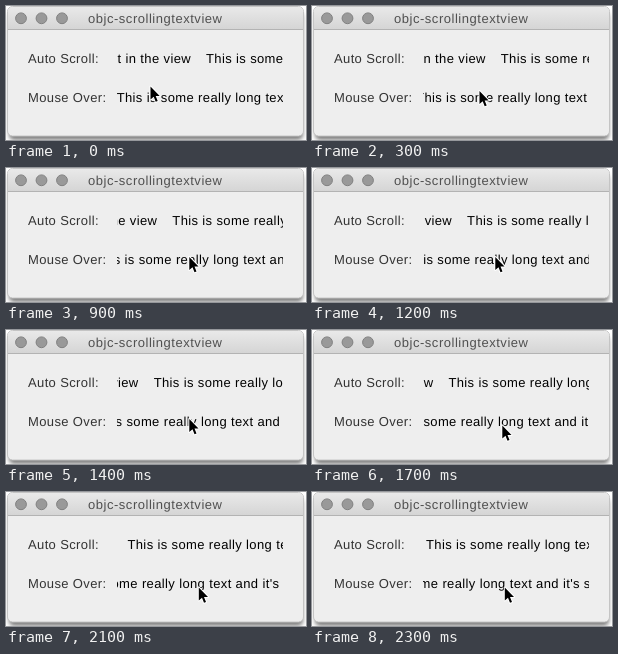
An HTML page that plays this animation: 300 px wide and 134 px high, repeating every 2400 ms.

```html
<!DOCTYPE html>
<html lang="en">
<head>
<meta charset="utf-8">
<title>Scrolling text view</title>
<style>
  html, body { margin: 0; width: 100%; height: 100%; overflow: hidden; background: #fff; }
  svg { display: block; width: 300px; height: 134px; }
  text {
    font: 13px "Liberation Sans", Arial, sans-serif;
    letter-spacing: .37px;
    text-rendering: geometricPrecision;
    white-space: pre;
  }
  .title { fill: #505050; letter-spacing: .53px; }
  .label { fill: #333; }
</style>
</head>
<body>
<svg viewBox="0 0 300 134">
  <defs>
    <linearGradient id="bar" x2="0" y2="1">
      <stop stop-color="#e9e9e9"/>
      <stop offset="1" stop-color="#d5d5d5"/>
    </linearGradient>
    <filter id="soft" x="-10%" y="-10%" width="120%" height="120%">
      <feGaussianBlur stdDeviation="2"/>
    </filter>
    <clipPath id="field"><rect x="111" y="40" width="166" height="70"/></clipPath>
  </defs>

  <rect x="3" y="6" width="294" height="128" rx="5" fill="#000" opacity=".5" filter="url(#soft)"/>
  <rect x="1.5" y=".5" width="296" height="129.5" rx="5" fill="#eee" stroke="#c4c4c4"/>
  <path d="M2 23V5.5Q2 1 6.5 1h286Q297 1 297 5.5V23z" fill="url(#bar)"/>
  <path d="M2 23.5h295" stroke="#b3b3b3"/>
  <g fill="#999" stroke="#808080">
    <circle cx="15" cy="12.3" r="5.4"/>
    <circle cx="35.5" cy="12.3" r="5.4"/>
    <circle cx="56" cy="12.3" r="5.4"/>
  </g>
  <text class="title" x="82" y="17">objc-scrollingtextview</text>

  <text class="label" x="22" y="57">Auto Scroll:</text>
  <text class="label" x="22" y="96">Mouse Over:</text>
  <g clip-path="url(#field)">
    <g id="auto">
      <text x="-15" y="57" text-anchor="end">it in the view</text>
      <text y="57">This is some really long text and it's</text>
    </g>
    <g id="hover"><text y="96">This is some really long text and it's so</text></g>
  </g>
  <path id="cursor" d="M.8 1.5V14.6L4 11.8 6 16.8 8 16 6 11H10z"
        stroke="#fff" stroke-width="2" stroke-linejoin="round" paint-order="stroke"/>
</svg>
<script>
  const LOOP = 2400, STEP = 100;
  // Rows: step, value(s)
  const hoverKeys = [[0, 110.7], [5, 99.7], [9, 88.5], [14, 76.3], [17, 67.3], [19, 60], [23, 49]];
  const cursorKeys = [[0, 143.7, 79], [5, 182, 86.5], [6, 182.5, 87.5], [14, 182.5, 87.5],
                      [17, 189.5, 94], [19, 192, 94], [23, 192, 94]];

  const [auto, hover, cursor] = ["auto", "hover", "cursor"].map(id => document.getElementById(id));

  function at(keys, step) {
    const i = Math.max(1, keys.findIndex(k => k[0] >= step));
    const a = keys[i - 1], b = keys[i];
    const p = (step - a[0]) / (b[0] - a[0]);
    return a.slice(1).map((v, n) => v + (b[n + 1] - v) * p);
  }

  function place(node, x, y = 0) {
    node.setAttribute("transform", `translate(${x.toFixed(2)} ${y.toFixed(2)})`);
  }

  function draw(now) {
    const step = Math.floor(now % LOOP / STEP);
    place(auto, 200 - 3.74 * step);
    place(hover, ...at(hoverKeys, step));
    place(cursor, ...at(cursorKeys, step));
    requestAnimationFrame(tick);
  }

  const start = performance.now();
  function tick() { draw(performance.now() - start); }
  draw(0);
</script>
</body>
</html>
```
